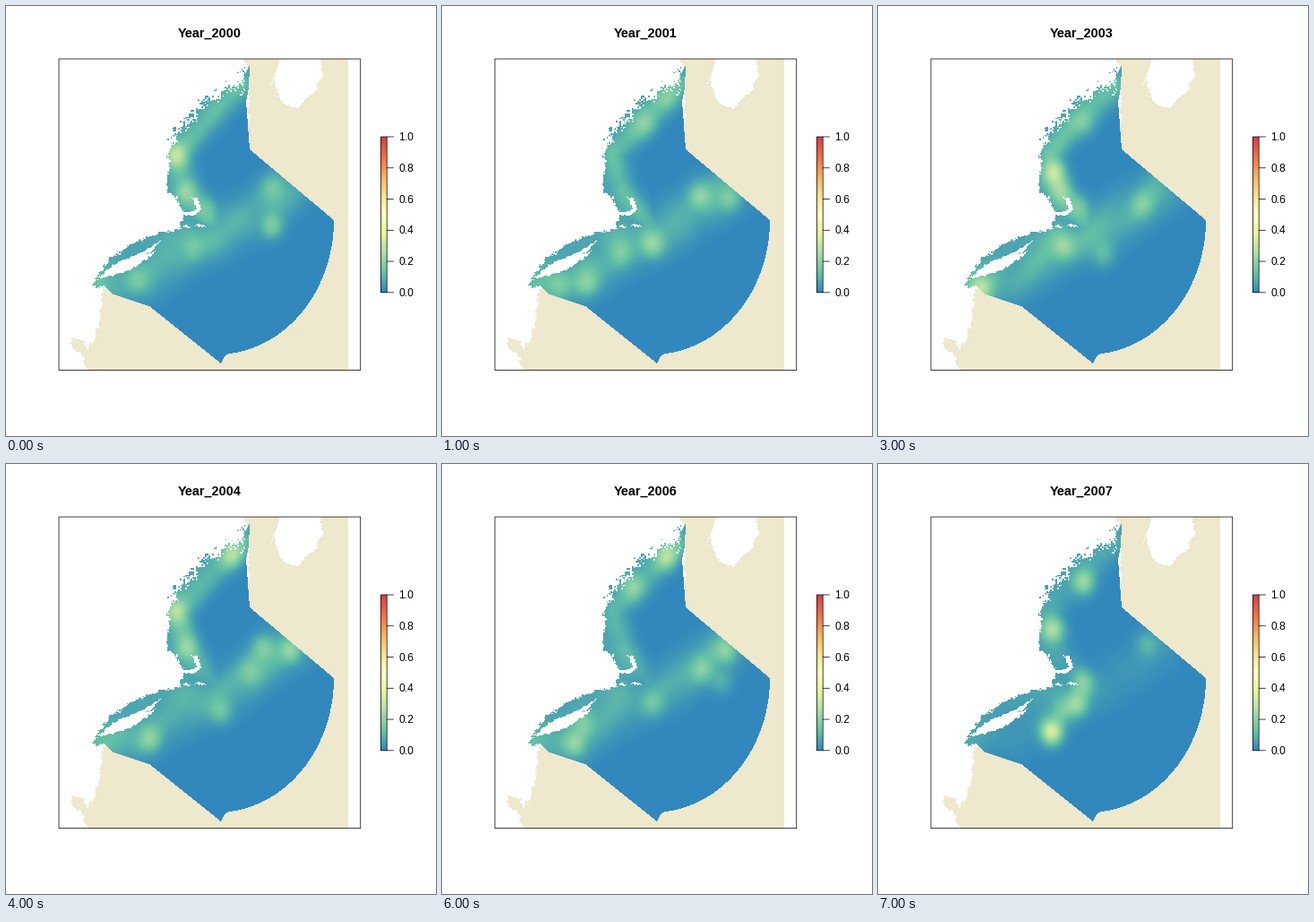
Write a matplotlib script that moves like this. It is 480 by 480 pixels and loops after 8000 ms.

```python
import numpy as np
import matplotlib.pyplot as plt
from matplotlib.animation import FuncAnimation
from matplotlib.colors import LinearSegmentedColormap, to_rgb
from matplotlib.patches import Rectangle
from matplotlib.path import Path

SIZE = 480
SAND = to_rgb("#EEE8CD")
CMAP = LinearSegmentedColormap.from_list("spectral", [
    "#3288BD", "#66C2A5", "#ABDDA4", "#E6F598", "#FFFFBF",
    "#FEE08B", "#FDAE61", "#F46D43", "#D53E4F"], N=512)

rng = np.random.default_rng(7)
X, Y = np.meshgrid(np.arange(SIZE) + 0.5, np.arange(SIZE) + 0.5)


def inside(points, x=X, y=Y):
    grid = np.column_stack([x.ravel(), y.ravel()])
    return Path(points).contains_points(grid).reshape(x.shape)


def distance(points):
    """Distance of each pixel to a polyline."""
    best = np.full(X.shape, 1e9)
    for (x0, y0), (x1, y1) in zip(points, points[1:]):
        dx, dy = x1 - x0, y1 - y0
        t = np.clip(((X - x0) * dx + (Y - y0) * dy) / (dx * dx + dy * dy), 0, 1)
        best = np.minimum(best, np.hypot(X - x0 - t * dx, Y - y0 - t * dy))
    return best


def rough():
    """Blocky noise on two scales, for ragged shorelines."""
    noise = 0
    for block in (2, 5):
        cells = rng.uniform(-0.5, 0.5, (SIZE // block, SIZE // block))
        noise = noise + np.kron(cells, np.ones((block, block)))
    return noise


# Key points of the map, in pixels
coast = [(272, 66), (262, 87), (240, 98), (221, 108), (208, 124), (190, 143),
         (181, 165), (182, 185), (179, 209), (190, 213), (198, 232),
         (194, 248), (175, 252), (145, 264), (119, 279), (104, 298), (97, 313)]
south = [(110, 313), (120, 322), (160, 335), (240, 399), (244, 391)]
angle = np.radians(np.linspace(84, 0, 30))
arc = list(zip(235 + 131 * np.cos(angle), 239 + 150 * np.sin(angle)))
east = [(272, 160), (268, 106), (271, 92)]

lands = [
    [(102, 304), (120, 288), (149, 276), (173, 262), (161, 275),
     (151, 280), (168, 273), (146, 291), (125, 299)],
    [(205, 213), (214, 215), (218, 227), (211, 233), (196, 235),
     (196, 231), (208, 229), (214, 225)],
    [(195, 247), (201, 244), (206, 247)],
    [(211, 246), (216, 243), (223, 246)]]
peninsula = [(306, 59), (300, 80), (303, 98), (309, 109), (326, 115),
             (334, 104), (345, 97), (354, 75), (350, 59)]
sliver = [(293, 93), (303, 70), (312, 59), (317, 59), (304, 73)]
sand_area = [(108, 316), (106, 347), (97, 374), (90, 385), (89, 374),
             (73, 370), (73, 380), (86, 391), (91, 407), (382, 407),
             (382, 59), (265, 59), (270, 67), (272, 160), (240, 240),
             (200, 300)]

jag_x, jag_y = rough(), rough()
near = (distance(coast) < 13) & (X < 267)
reach = near * np.where(Y < 155, 11, 3)
water = inside(coast + south + arc + east, X + reach * jag_x, Y + reach * jag_y)
for land in lands:
    water &= ~inside(land, X + 1.5 * jag_x, Y + 1.5 * jag_y)

shift_x = 2.5 * jag_x * (X < 370)
sand = inside(sand_area, X + shift_x, Y)
for land in (peninsula, sliver):
    sand &= ~inside(land, X + shift_x, Y)

base = np.ones((SIZE, SIZE, 3))
base[sand] = SAND


def band(points, width, amp):
    return amp * np.exp(-(distance(points) / width) ** 2)


shore = band(coast, 18, 0.05)
shelf = np.maximum(
    band([(262, 90), (225, 130), (193, 165), (203, 205), (240, 255)], 14, 0.08),
    band([(112, 312), (150, 305), (200, 272), (240, 255), (312, 207)], 24, 0.09))


def ripple():
    """Slow random waves that vary the shelf from year to year."""
    waves = [np.sin(kx * X + ky * Y + phase) for kx, ky, phase in
             rng.uniform((-0.15, -0.1, 0), (0.15, 0.1, 6.3), (3, 3))]
    return 1 + 0.25 * sum(waves) / 3


def density(strength, *spots):
    total = shore + strength * shelf * ripple()
    for x, y, amp in spots:
        total = total + amp * np.exp(-((X - x) / 12) ** 2 - ((Y - y) / 14) ** 2)
    return total


# Shelf strength, then the main hot spots (x, y, height) of each year
y2000 = density(1.0, (190, 167, .20), (201, 207, .12), (225, 228, .08),
                (208, 270, .08), (297, 246, .13), (297, 201, .08),
                (146, 306, .06))
y2001 = density(1.1, (253, 103, .08), (227, 131, .10), (287, 212, .11),
                (321, 216, .10), (235, 266, .12), (200, 274, .08),
                (162, 310, .10), (131, 312, .06))
y2003 = density(1.1, (230, 130, .08), (196, 187, .20), (205, 207, .12),
                (225, 225, .10), (295, 222, .09), (207, 268, .13),
                (115, 316, .17), (252, 278, .08))
y2004 = density(1.0, (252, 102, .15), (190, 165, .16), (203, 204, .12),
                (287, 205, .11), (318, 208, .13), (273, 232, .08),
                (240, 277, .10), (161, 307, .12))
y2006 = density(0.9, (251, 104, .16), (213, 138, .12), (317, 208, .13),
                (290, 230, .10), (312, 243, .07), (235, 267, .08),
                (148, 313, .14), (158, 290, .10))
y2007 = density(0.4, (230, 132, .18), (195, 185, .20), (229, 244, .15),
                (222, 268, .18), (206, 275, .10), (194, 299, .32),
                (300, 201, .08))
years = [y2000, y2001, (y2001 + y2003) / 2, y2003,
         y2004, (y2004 + y2006) / 2, y2006, y2007]


def render(values):
    picture = base.copy()
    picture[water] = CMAP(values[water])[:, :3]
    return picture


pictures = [render(values) for values in years]

fig = plt.figure(figsize=(SIZE / 72, SIZE / 72), dpi=72, facecolor="white")
ax = fig.add_axes([0, 0, 1, 1])
ax.axis("off")
LEFT, RIGHT, TOP, BOTTOM = 59.04, 395.76, 59.04, 406.56
BAR_LEFT, BAR_RIGHT, BAR_TOP, BAR_BOTTOM = 418.4, 425.2, 146, 319.8

chart = ax.imshow(pictures[0], extent=(0, SIZE, SIZE, 0),
                  interpolation="nearest", aspect="auto")
ax.imshow(np.linspace(1, 0, 174)[:, None], cmap=CMAP, vmin=0, vmax=1,
          extent=(BAR_LEFT, BAR_RIGHT, BAR_BOTTOM, BAR_TOP),
          interpolation="nearest", aspect="auto")


def outline(x0, y0, x1, y1):
    ax.add_patch(Rectangle((x0, y0), x1 - x0, y1 - y0, fill=False,
                           ec="black", lw=0.75, snap=False))


outline(LEFT, TOP, RIGHT, BOTTOM)
outline(BAR_LEFT, BAR_TOP, BAR_RIGHT, BAR_BOTTOM)
for value in np.linspace(0, 1, 6):
    y = BAR_BOTTOM + value * (BAR_TOP - BAR_BOTTOM)
    ax.plot([BAR_RIGHT, BAR_RIGHT + 7.2], [y, y], color="black", lw=0.75,
            snap=False)
    ax.text(438.5, y + 4, f"{value:.1f}", family="Liberation Sans", size=12,
            va="baseline")
title = ax.text((LEFT + RIGHT) / 2, 35, "", family="Liberation Sans",
                size=14.4, weight="bold", ha="center", va="baseline")
ax.set_xlim(0, SIZE)
ax.set_ylim(SIZE, 0)


def update(i):
    chart.set_data(pictures[i])
    title.set_text(f"Year_{2000 + i}")
    return chart, title


anim = FuncAnimation(fig, update, frames=len(years), interval=1000,
                     repeat=True, repeat_delay=0)
plt.show()
```
